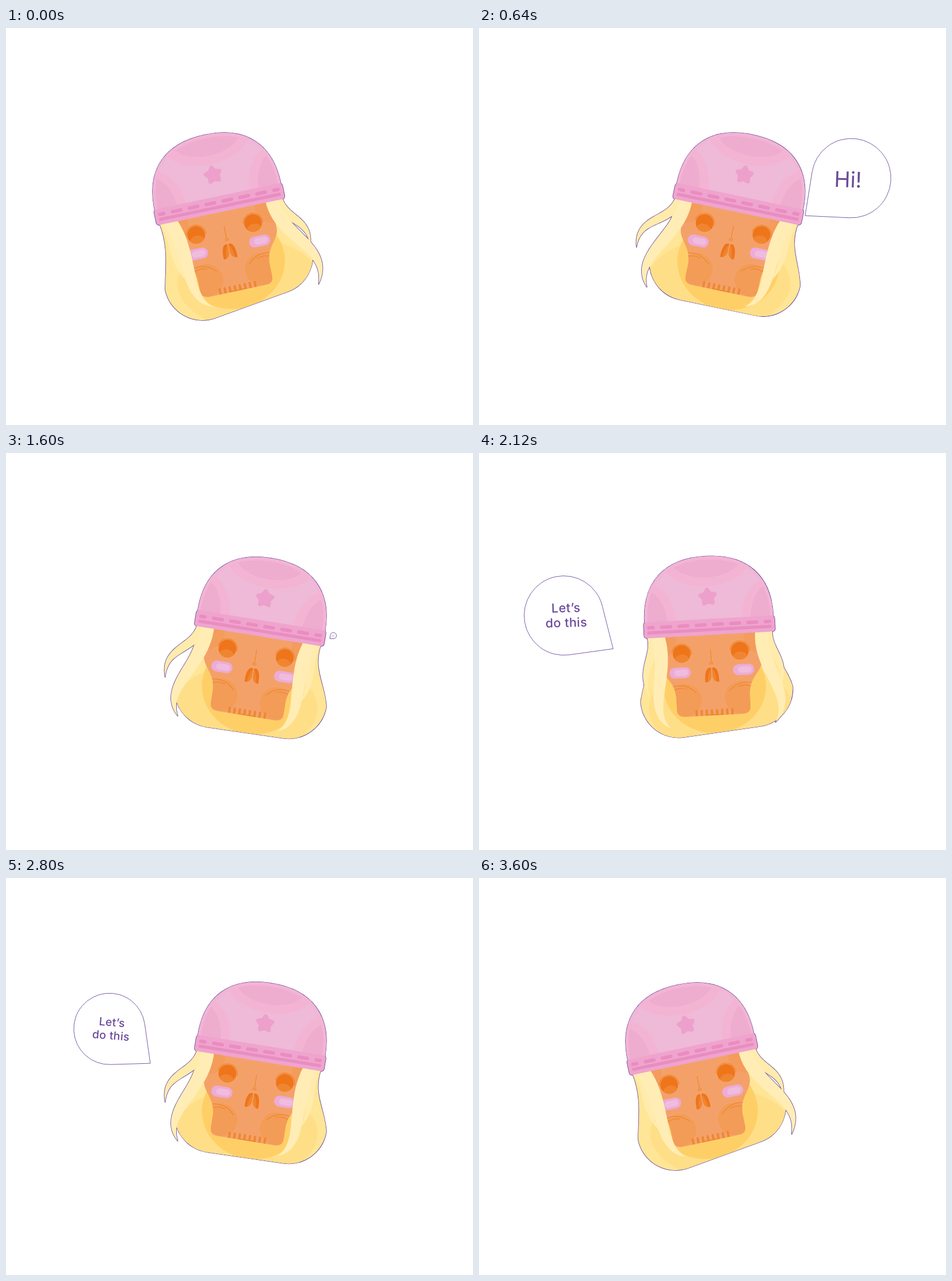
An HTML page that plays this animation: 812x690 px, repeating every 3.64 s.

```html
<!DOCTYPE html>
<html lang="en">
<head>
<meta charset="utf-8">
<title>Let’s do this</title>
<style>
html, body { margin: 0; width: 100%; height: 100%; overflow: hidden; background: #fff; }
svg { display: block; width: 100vw; height: 100vh; }
text { font-family: Inter, "Open Sans", sans-serif; fill: #6b4a9b; text-anchor: middle; }
.bubble path { fill: #fff; stroke: #6b4a9b; stroke-width: .9; vector-effect: non-scaling-stroke; }
.line { fill: none; stroke: #ee8428; stroke-width: 1.1; stroke-linecap: round; }
#edge { fill: #5a3a94; stroke: #5a3a94; stroke-width: 1.5; }
</style>
</head>
<body>
<svg viewBox="0 0 812 690">
  <defs>
    <clipPath id="backClip"><path id="backShape"/></clipPath>
    <path id="faceShape" d="M-88-200L-89-134C-89-112-64-105-64-72V-53Q-64-40-51-40H51Q64-40 64-53V-72C64-105 89-112 89-134L88-200Z"/>
    <clipPath id="faceClip"><use href="#faceShape"/></clipPath>
    <path id="dome" d="M-112-200V-208C-112-278-72-317 0-317S112-278 112-208V-200Z"/>
    <clipPath id="domeClip"><use href="#dome"/></clipPath>
    <clipPath id="rim"><path d="M-107-200V-208C-107-275-69-311 0-311S107-275 107-208V-200Z"/></clipPath>
    <clipPath id="socket"><circle r="15.5"/></clipPath>
    <g id="eye">
      <circle r="15.5" fill="#ef751a"/>
      <ellipse cy="11" rx="12.5" ry="9.5" fill="#f08531" clip-path="url(#socket)"/>
      <path class="line" d="M-17-3A17.3 17.3 0 0 1 17.2 2"/>
    </g>
    <g id="blush">
      <rect x="-18.5" y="-9.5" width="37" height="19" rx="9.5" fill="#edabd8"/>
      <rect x="-10" y="-5.5" width="24" height="11" rx="5.5" fill="#f0bcdd"/>
    </g>
    <g id="nostril">
      <path d="M-1-123C-9-126-13-113-12-98C-6-97-1-103-1-110Z" fill="#ef751a"/>
      <path d="M-1.2-121C-5-118-7-107-8-98.6C-4-99-1.2-104-1.2-110Z" fill="#f08531"/>
    </g>
    <g id="cheek">
      <circle cx="-88" cy="-172" r="29" fill="#f39c5c"/>
      <circle cx="-48" cy="-69" r="28" fill="#f39c57"/>
      <path class="line" d="M-70-93Q-47-100-29-81M-66-88Q-54-92-45-88"/>
    </g>
  </defs>

  <g id="hi" class="bubble"><path/><text font-size="47">Hi!</text></g>
  <g id="lets" class="bubble"><path/>
    <text font-size="27" font-weight="500" letter-spacing=".5"><tspan x="5" y="-7">Let’s</tspan><tspan x="5" y="25">do this</tspan></text>
  </g>

  <g id="head">
    <g id="edge">
      <use href="#dome"/><rect x="-114" y="-208" width="228" height="28" rx="5"/>
    </g>
    <path id="back" fill="#ffe596"/>
    <g clip-path="url(#backClip)">
      <ellipse id="mid" cy="-52" rx="125" ry="78" fill="#ffde88"/>
      <ellipse cx="4" cy="-90" rx="89" ry="81" fill="#ffcf67"/>
    </g>
    <use href="#faceShape" fill="#f4a169"/>
    <g clip-path="url(#faceClip)">
      <use href="#cheek"/><use href="#cheek" transform="scale(-1 1)"/>
      <g id="teeth" fill="#ee8730"><rect x="-15" y="-42" width="32" height="2"/></g>
    </g>
    <use href="#eye" x="-50.5" y="-150"/><use href="#eye" x="50.5" y="-150"/>
    <use href="#nostril"/><use href="#nostril" transform="scale(-1 1)"/>
    <path class="line" d="M0-155V-129M-2.5-133V-129M2.5-133V-129"/>
    <use href="#blush" x="-55" y="-117"/><use href="#blush" x="55.5" y="-117"/>
    <g id="locks"></g>
    <use href="#dome" fill="#f0b6d6"/>
    <use href="#dome" fill="#eebad7" clip-path="url(#rim)"/>
    <g clip-path="url(#domeClip)" fill="#f3b4d4">
      <ellipse cy="-311" rx="77" ry="46"/>
      <ellipse cx="-108" cy="-200" rx="52" ry="75"/><ellipse cx="108" cy="-200" rx="52" ry="75"/>
    </g>
    <g clip-path="url(#rim)" fill="#eeaccf">
      <ellipse cy="-311" rx="59" ry="31"/>
      <ellipse cx="-108" cy="-200" rx="36" ry="62"/><ellipse cx="108" cy="-200" rx="36" ry="62"/>
    </g>
    <polygon id="star" fill="#eda0cb" stroke="#eda0cb" stroke-width="7" stroke-linejoin="round"/>
    <rect x="-114" y="-208" width="228" height="28" rx="5" fill="#efa4ce"/>
    <g id="band" fill="#e98dc0"><rect x="-108" y="-192" width="216" height="5.5" rx="2"/></g>
  </g>
</svg>
<script>
// The head and bubbles are drawn upright around this pivot, then turned.
const PX = 411, PY = 496, TILT = 11.9, LOOP = 3640, STEP = 40, SWING = 600;
const $ = id => document.getElementById(id);
const rad = d => d * Math.PI / 180;
const lerp = (a, b, k) => a + (b - a) * k;

function add(parent, tag, attrs = {}) {
  const el = document.createElementNS("http://www.w3.org/2000/svg", tag);
  for (const k in attrs) el.setAttribute(k, attrs[k]);
  return parent.appendChild(el);
}

function outlined(...paths) {
  const all = [add($("edge"), "path"), ...paths];
  return d => all.forEach(el => el.setAttribute("d", d));
}

// Back hair: a tilting stadium joined to the hat by two waisted sides.
const setBack = outlined($("back"), $("backShape"));
function drawBack(k) {
  const r = 66, half = 67, a = rad(lerp(-8, 0, k)), mx = lerp(9.5, 1.4, k), my = -76.6;
  const c = Math.cos(a), s = Math.sin(a);
  const lx = mx - half * c, ly = my - half * s, rx = mx + half * c, ry = my + half * s;
  const arc = `A${r} ${r} 0 0 0`;
  setBack(`M-109-183C-101-138 ${lx - r + 8} ${ly - 38} ${lx - r} ${ly}` +
    `${arc} ${lx - r * s} ${ly + r * c}L${rx - r * s} ${ry + r * c}` +
    `${arc} ${rx + r} ${ry}C${rx + r - 8} ${ry - 38} 101-138 109-183Z`);
}

// A lock is a tapering ribbon on a cubic spine that moves between hanging and flying.
function lock(side, fill, width, root, hang, fly) {
  const set = outlined(add($("locks"), "path", { fill }));
  return k => {
    const f = side < 0 ? k : 1 - k;
    const pts = [root, ...hang.map((p, i) => p.map((v, j) => lerp(v, fly[i][j], f)))];
    const left = [], right = [], n = 24;
    for (let i = 0; i <= n; i++) {
      const t = i / n, q = 1 - t;
      const [x, y] = [0, 1].map(j => q * q * q * pts[0][j] + 3 * q * q * t * pts[1][j] + 3 * q * t * t * pts[2][j] + t * t * t * pts[3][j]);
      const [dx, dy] = [0, 1].map(j => q * q * (pts[1][j] - pts[0][j]) + 2 * q * t * (pts[2][j] - pts[1][j]) + t * t * (pts[3][j] - pts[2][j]));
      const w = width * (1 - t ** 3) / Math.hypot(dx, dy);
      left.push([side * (x - dy * w), y + dx * w]);
      right.unshift([side * (x + dy * w), y - dx * w]);
    }
    set("M" + [...left, ...right].map(p => p.map(v => v.toFixed(2)).join(" ")).join("L") + "Z");
  };
}

const outerRoot = [101, -184], outerHang = [[85, -150], [103, -118], [84, -77]];
const innerRoot = [91, -184], innerHang = [[62, -125], [95, -45], [47, -22]];
const outer = (side, fly) => lock(side, "#ffebac", 8, outerRoot, outerHang, fly);
const inner = (side, fly) => lock(side, "#ffedb5", 11.5, innerRoot, innerHang, fly);
const locks = [
  outer(-1, [[108, -135], [168, -140], [158, -84]]),
  outer(1, [[105, -140], [148, -140], [140, -91]]),
  inner(-1, [[88, -115], [162, -70], [126, -20]]),
  inner(1, [[90, -115], [175, -84], [140, -22]])
];

for (let i = 0; i < 8; i++) {
  add($("teeth"), "rect", { x: -32 + i * 8.9, y: -51, width: 3.8, height: 13, rx: 1.9 });
  const end = i % 7 === 0, w = end ? 13 : 21, x = (i - 3.5) * (end ? 29 : 30);
  add($("band"), "rect", { x: x - w / 2, y: -201, width: w, height: 6, rx: 3 });
}

$("star").setAttribute("points", Array.from({ length: 10 }, (_, i) => {
  const r = i % 2 ? 7.5 : 13, a = rad(i * 36 - 93);
  return `${r * Math.cos(a)},${-246 + r * Math.sin(a)}`;
}).join(" "));

const smooth = v => { v = Math.min(1, Math.max(0, v)); return v * v * (3 - 2 * v); };

// Teardrop with its tip at (x, y) and its circle along the given angle; grows, stays, shrinks.
function bubble(id, angle, x, y, textMove, start) {
  const el = $(id), r = 86, half = rad(41.81), len = r * Math.sqrt(1.25), a = rad(angle);
  const at = (b, d) => `${d * Math.cos(b)} ${d * Math.sin(b)}`;
  el.querySelector("path").setAttribute("d", `M0 0L${at(a + half, len)}A${r} ${r} 0 1 0 ${at(a - half, len)}Z`);
  el.querySelector("text").setAttribute("transform", `translate(${at(a, 1.5 * r)}) ${textMove}`);
  return (t, tilt) => {
    const s = smooth((t - start) / 560) - smooth((t - start - 885) / 560);
    el.style.display = s > 0.001 ? "" : "none";
    el.setAttribute("transform", `translate(${PX} ${PY}) rotate(${tilt / 2}) translate(${x} ${y}) scale(${s})`);
  };
}

const bubbles = [
  bubble("hi", -45, 137.7, -185, "rotate(-4) translate(-7 20)", 240),
  bubble("lets", 215.5, -173.5, -160.5, "", 1720)
];

// cubic-bezier(.76, 0, .24, 1), solved by bisection
function ease(u) {
  let lo = 0, hi = 1;
  for (let i = 0; i < 30; i++) {
    const s = (lo + hi) / 2, q = 1 - s;
    if (2.28 * s * q * q + 0.72 * s * s * q + s * s * s < u) lo = s; else hi = s;
  }
  return smooth(lo);
}

function draw(ms) {
  const t = Math.floor((ms % LOOP) / STEP) * STEP;
  const u = t % (2 * SWING) / SWING;
  const k = u < 1 ? ease(u) : 1 - ease(u - 1);
  const tilt = lerp(-TILT, TILT, k);
  $("head").setAttribute("transform", `translate(${PX} ${PY}) rotate(${tilt})`);
  $("mid").setAttribute("transform", `rotate(${-tilt})`);
  $("mid").setAttribute("cx", lerp(12, 5, k));
  drawBack(k);
  locks.forEach(f => f(k));
  bubbles.forEach(f => f(t, tilt));
}

let first;
function tick(now) {
  first ??= now;
  draw(now - first);
  requestAnimationFrame(tick);
}
draw(0);
requestAnimationFrame(tick);
</script>
</body>
</html>
```
